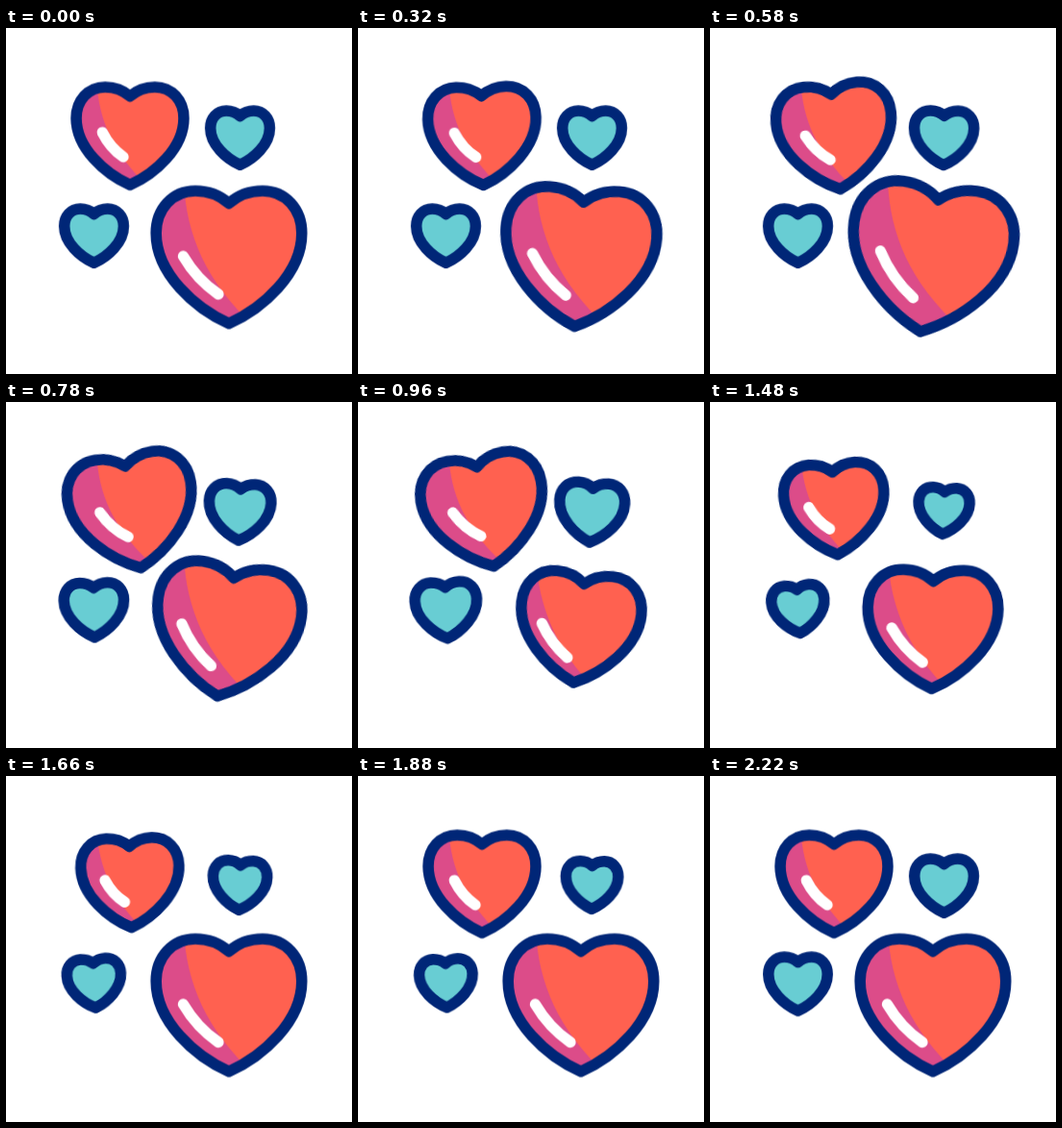
An HTML page that plays this animation: 360x360 px, repeating every 2.4 s.

```html
<!DOCTYPE html>
<html lang="en">
<head>
<meta charset="utf-8">
<title>Beating hearts</title>
<style>
  html, body { margin: 0; width: 100%; height: 100%; overflow: hidden; background: #fff; }
  svg { display: block; width: 100%; height: 100%; }
  path { vector-effect: non-scaling-stroke; stroke-linecap: round; stroke-linejoin: round; }

  .outline { fill: none; stroke: #002677; stroke-width: 11.5px; }
  .coral { fill: #ff6150; }
  .teal { fill: #68cdd3; }
  .shade { fill: #dc4c89; }
  .gloss { fill: none; stroke: #fff; stroke-width: 11.3px; }

  .tilt { animation: tilt 2.4s linear var(--delay) infinite; }
  .beat { animation: beat 2.4s ease-in-out var(--delay) infinite; }

  /* slow swell, then two quick bounces back to rest */
  @keyframes beat {
    0% { transform: scale(1); animation-timing-function: ease-in; }
    27.08% { transform: scale(var(--peak)); }
    37.08% { transform: scale(var(--dip)); }
    47.08% { transform: scale(var(--rise)); }
    57.08% { transform: scale(var(--dip2)); }
    67.08%, 100% { transform: scale(1); }
  }
  @keyframes tilt {
    0% { transform: rotate(0deg); }
    27.08% { transform: rotate(var(--angle)); }
    65%, 100% { transform: rotate(0deg); }
  }

  .large { --delay: 20ms; --angle: 9deg; --peak: 1.135; --dip: .808; --rise: 1.01; --dip2: .85; }
  .medium { --delay: 240ms; --angle: -10.5deg; --peak: 1.215; --dip: .775; --rise: .955; --dip2: .905; }
  .right { --delay: 470ms; --angle: 5deg; --peak: 1.16; --dip: .8; --rise: .92; --dip2: .875; }
  .left { --delay: 640ms; --angle: -5.5deg; --peak: 1.145; --dip: .87; --rise: .94; --dip2: .85; }
</style>
</head>
<body>
<svg viewBox="0 0 360 360">
  <defs>
    <path id="heart" d="M0-38C9-46 21-51 35-51C59-51 75.8-32 75.8-7C75.8 35 35 71.5 0 87C-35 71.5-75.8 35-75.8-7C-75.8-32-59-51-35-51C-21-51-9-46 0-38Z"/>
    <!-- lit side: its edge stays still while the heart moves behind it -->
    <clipPath id="lit"><path d="M-47-60C-44-5-25 42 28 92L40 130H130V-110H-47Z"/></clipPath>
  </defs>

  <g class="medium" transform="translate(129 99) scale(.738)">
    <g class="tilt"><g class="beat"><use href="#heart" class="shade"/></g></g>
    <g clip-path="url(#lit)">
      <g class="tilt"><g class="beat"><use href="#heart" class="coral"/></g></g>
    </g>
    <g class="tilt"><g class="beat">
      <path class="gloss" d="M-39 13Q-28 35-9.5 47.5"/>
      <use href="#heart" class="outline"/>
    </g></g>
  </g>

  <g class="right" transform="translate(243.5 107) scale(.407)">
    <g class="tilt"><g class="beat">
      <use href="#heart" class="teal"/>
      <use href="#heart" class="outline"/>
    </g></g>
  </g>

  <g class="left" transform="translate(91.5 209) scale(.407)">
    <g class="tilt"><g class="beat">
      <use href="#heart" class="teal"/>
      <use href="#heart" class="outline"/>
    </g></g>
  </g>

  <g class="large" transform="translate(231.9 220.5)">
    <g class="tilt"><g class="beat"><use href="#heart" class="shade"/></g></g>
    <g clip-path="url(#lit)">
      <g class="tilt"><g class="beat"><use href="#heart" class="coral"/></g></g>
    </g>
    <g class="tilt"><g class="beat">
      <path class="gloss" d="M-47.5 17Q-33.5 41-11 56.5"/>
      <use href="#heart" class="outline"/>
    </g></g>
  </g>
</svg>
</body>
</html>
```
